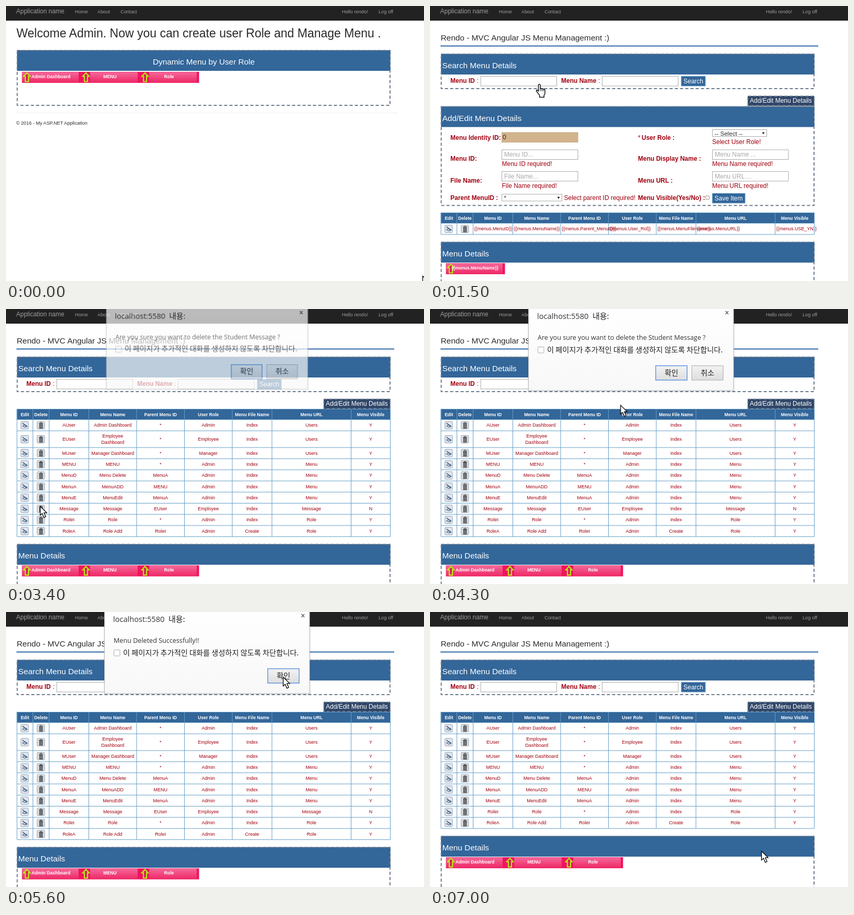
An HTML page that plays this animation: 800 by 526 pixels, repeating every 7.1 s.

```html
<!DOCTYPE html>
<html lang="en">
<head>
<meta charset="utf-8">
<title>Menu management</title>
<style>
html, body { margin: 0; width: 100%; height: 100%; overflow: hidden; background: #fff; }
svg { display: block; width: 100vw; height: 100vh; font-family: "Liberation Sans", Arial, sans-serif; }
text { white-space: pre; fill: #9f000f; }
.b { font-weight: bold; }
.c { text-anchor: middle; }
.w { fill: #fff; }
.n { fill: #9d9d9d; }
.k { fill: #2b2b2b; }
.p { fill: #a9a9a9; }
.d { fill: #333; font-family: "Open Sans", "Noto Sans CJK KR", "Noto Sans CJK", sans-serif; }
.ko { fill: #222; font-family: "Noto Sans CJK KR", "Noto Sans CJK", "Noto Sans CJK JP", sans-serif; }

.page, .dialog, .arrow, .hand { opacity: 0; animation: 7.1s step-end infinite; }
#home { animation-name: home; }
#draft { animation-name: draft; }
#full { animation-name: full; }
#short { animation-name: short; }
.dialog { transform-origin: 385px 0; }
#ask { animation-name: ask; }
#done { animation-name: done; }
#cursor { animation: move 7.1s infinite; }
.arrow { animation-name: arrow; }
.hand { animation-name: hand; }

@keyframes home { 0% { opacity: 1 } 21.12%, 100% { opacity: 0 } }
@keyframes draft { 0% { opacity: 0 } 21.12% { opacity: 1 } 23.94%, 100% { opacity: 0 } }
@keyframes full { 0% { opacity: 0 } 23.94% { opacity: 1 } 81.69%, 100% { opacity: 0 } }
@keyframes short { 0% { opacity: 0 } 81.69%, 100% { opacity: 1 } }
@keyframes ask {
  0% { opacity: 0; transform: none }
  47.88% { opacity: .7; transform: scale(.982) }
  49.29% { opacity: 1; transform: none }
  64.78%, 100% { opacity: 0; transform: none }
}
@keyframes done {
  0% { opacity: 0; transform: none }
  66.19% { opacity: .88; transform: scale(.993) }
  67.6% { opacity: 1; transform: none }
  80.28%, 100% { opacity: 0; transform: none }
}
@keyframes arrow { 0% { opacity: 1 } 18.3% { opacity: 0 } 23.94%, 100% { opacity: 1 } }
@keyframes hand { 0% { opacity: 0 } 18.3% { opacity: 1 } 23.94%, 100% { opacity: 0 } }
@keyframes move {
  0% { transform: translate(797px, 516px); animation-timing-function: steps(8) }
  11.26% { transform: translate(692px, 203px); animation-timing-function: steps(5) }
  18.3% { transform: translate(200px, 134px); animation-timing-function: step-end }
  21.12% { transform: translate(209px, 149px); animation-timing-function: steps(5) }
  28.16% { transform: translate(119px, 407px); animation-timing-function: step-end }
  30.98% { transform: translate(119px, 407px); animation-timing-function: steps(8) }
  42.25% { transform: translate(65px, 377px); animation-timing-function: step-end }
  52.11% { transform: translate(65px, 377px); animation-timing-function: steps(8) }
  63.38% { transform: translate(464px, 119px); animation-timing-function: step-end }
  67.6% { transform: translate(464px, 119px); animation-timing-function: steps(8) }
  78.87% { transform: translate(530px, 124px); animation-timing-function: step-end }
  88.73% { transform: translate(530px, 124px); animation-timing-function: steps(7) }
  98.59%, 100% { transform: translate(634px, 457px); animation-timing-function: step-end }
}
</style>
</head>
<body>
<svg id="stage" viewBox="0 0 800 526" preserveAspectRatio="none"></svg>
<script>
(() => {
const BLUE = '#336699', LINE = '#659ec7', SLATE = '#6d7b8d';

const text = (x, y, str, cls = '', size = 12) =>
  `<text x="${x}" y="${y}" class="${cls}" font-size="${size}">${str}</text>`;
const rect = (x, y, w, h, fill, stroke = 'none', extra = '') =>
  `<rect x="${x}" y="${y}" width="${w}" height="${h}" fill="${fill}" stroke="${stroke}" ${extra}/>`;
const path = (d, stroke, width = 1, fill = 'none') =>
  `<path d="${d}" fill="${fill}" stroke="${stroke}" stroke-width="${width}"/>`;
const group = (id, cls, body) => `<g id="${id}" class="${cls}">${body}</g>`;

const dashed = (x, y, w, h) => rect(x, y, w, h, 'none', SLATE, 'stroke-width="2" stroke-dasharray="6 4"');

function panel(y, h, title, centred) {
  return rect(21, y, 715, 39.5, BLUE) + dashed(21.5, y + .5, 713.5, h) +
    (centred ? text(378.5, y + 27.5, title, 'w c', 15.33) : text(23.5, y + 27.5, title, 'w', 15.33));
}

function bar(y, labels) {
  let out = rect(30.5, y, labels.length * 113, 21, '#f0145c');
  labels.forEach((label, i) => {
    const x = 31 + i * 113, left = i ? 17 : 0, a = x + 9;
    out += rect(x + left, y + .5, 108 - left, 20, 'url(#pink)') +
      path(`M${a} ${y + 2}l6 6.5h-3v10h-6v-10h-3z`, '#b4ee10', 2.2, '#d8205c') +
      text(x + 55, y + 11.5, label, 'w b c', 8.67);
  });
  return out;
}

const field = (x, y, hint = '') =>
  rect(x, y, 145.5, 18.5, '#fff', '#a9a9a9') + text(x + 4.5, y + 13, hint, 'p');
const button = (x, y, w, label) =>
  rect(x, y, w, 18.5, BLUE, LINE) + text(x + 4, y + 13, label, 'w');
const select = (x, y, w, value) =>
  rect(x, y, w, 13, '#fff', '#a9a9a9') + text(x + 4, y + 11, value, 'k', 11.6) +
  path(`M${x + w - 9} ${y + 5}h5l-2.5 4z`, 'none', 0, '#222');

const editIcon = (x, y) =>
  rect(x, y, 14.5, 14.5, '#dfe6ee', '#91a1b5', 'rx="1.5"') +
  path(`M${x + 3} ${y + 9}q4-5 9 0q-4 4-9 0z`, '#5b7492', 1.2, '#b9c8d8') +
  path(`M${x + 3} ${y + 3}l9 7`, '#41566f', 1.4);
const binIcon = (x, y) =>
  rect(x, y, 14.5, 14.5, '#dde2e7', '#98a2ad', 'rx="1.5"') +
  path(`M${x + 3.5} ${y + 3.5}h8M${x + 6} ${y + 2}h3`, '#444', 1.3) +
  rect(x + 4.5, y + 5, 6, 8, '#8b9299', '#444') +
  path(`M${x + 6.5} ${y + 5.5}v7M${x + 8.5} ${y + 5.5}v7`, '#444', .8);

const cols = [21, 51.5, 82.5, 158.5, 250, 341.5, 433, 509, 660.5, 735.5];
const heads = ['Edit', 'Delete', 'Menu ID', 'Menu Name', 'Parent Menu ID', 'User Role',
  'Menu File Name', 'Menu URL', 'Menu Visible'];
const mid = i => (cols[i] + cols[i + 1]) / 2;

// Returns the markup and the bottom edge.
function table(start, rows, raw) {
  let y = start + 20.2;
  let out = rect(21, start, 714.5, 20, BLUE, LINE) +
    heads.map((h, i) => text(mid(i), start + 13, h, 'w b c', 8.6)).join('');
  for (const row of rows) {
    const tall = row.some(cell => cell.includes('|')), h = tall ? 32 : 21.3, m = y + h / 2;
    out += editIcon(28.5, m - 7.2) + binIcon(59.5, m - 7.2);
    row.forEach((cell, i) => {
      const lines = cell.split('|'), x = raw ? cols[i + 2] + 2 : mid(i + 2);
      lines.forEach((s, j) => {
        out += text(x, m + 3 + (j - (lines.length - 1) / 2) * 12.5, s, raw ? '' : 'c', 9);
      });
    });
    y += h;
    out += path(`M21 ${y}H735.5`, LINE);
  }
  out += cols.map(x => path(`M${x} ${start}V${y}`, LINE)).join('');
  return [out, y];
}

const rows = `AUser,Admin Dashboard,*,Admin,Index,Users,Y
EUser,Employee|Dashboard,*,Employee,Index,Users,Y
MUser,Manager Dashboard,*,Manager,Index,Users,Y
MENU,MENU,*,Admin,Index,Menu,Y
MenuD,Menu Delete,MenuA,Admin,Index,Menu,Y
MenuA,MenuADD,MENU,Admin,Index,Menu,Y
MenuE,MenuEdit,MenuA,Admin,Index,Menu,Y
Message,Message,EUser,Employee,Index,Message,N
RoleI,Role,*,Admin,Index,Role,Y
RoleA,Role Add,RoleI,Admin,Create,Role,Y`.split('\n').map(r => r.split(','));
const rawRow = ['MenuID', 'MenuName', 'Parent_MenuID', 'User_Rol', 'MenuFileName', 'MenuURL', 'USE_YN']
  .map(k => `{{menus.${k}}}`);
const items = ['Admin Dashboard', 'MENU', 'Role'];

const nav = rect(0, 0, 800, 28, '#222') + text(19.5, 14.3, 'Application name', 'n') +
  [[132, 'Home'], [175, 'About'], [219, 'Contact'], [643, 'Hello rendo!'], [713, 'Log off']]
    .map(([x, s]) => text(x, 13.5, s, 'n', 9.2)).join('');

const home = text(20, 60, 'Welcome Admin. Now you can create user Role and Manage Menu .', 'k', 23) +
  panel(84.5, 105, 'Dynamic Menu by User Role', true) + bar(126, items) +
  path('M20 204.5H750', '#eee') + text(19.5, 227.3, '© 2016 - My ASP.NET Application', 'k', 9.15);

const search = text(20.5, 66, 'Rendo - MVC Angular JS Menu Management :)', 'k', 15.4) +
  path('M20 76.5H743', '#2f68a8', 2) + panel(91.5, 66, 'Search Menu Details') +
  text(39, 147, 'Menu ID', 'b') + text(89.5, 147, ':') + field(97, 134.5) +
  text(251, 147, 'Menu Name', 'b') + text(322, 147, ':') + field(329.5, 134.5) +
  button(481, 134.5, 46, 'Search') +
  rect(608, 172, 127.5, 19, '#2f4668') + dashed(608.5, 172.5, 126.5, 18) +
  text(612, 185, 'Add/Edit Menu Details', 'w');

const form = panel(192, 189, 'Add/Edit Menu Details') +
  [[39, 255.5, 'Menu Identity ID:'], [405, 255.5, 'User Role :'], [39, 296, 'Menu ID:'],
   [398, 296, 'Menu Display Name :'], [39, 337.5, 'File Name:'], [398, 337.5, 'Menu URL :'],
   [39, 371, 'Parent MenuID :'], [398, 371, 'Menu Visible(Yes/No) :']]
    .map(([x, y, s]) => text(x, y, s, 'b')).join('') +
  [[398, 255.5, '*'], [540, 264, 'Select User Role!'], [137.5, 306, 'Menu ID required!'],
   [540, 306, 'Menu Name required!'], [137.5, 347.5, 'File Name required!'],
   [540, 347.5, 'Menu URL required!'], [256.5, 371, 'Select parent ID required!']]
    .map(a => text(...a)).join('') +
  rect(137.5, 242, 145.5, 18.5, '#d2b48c', '#c4a87f') + text(139, 255, '0', 'k') +
  field(137.5, 275, 'Menu ID...') + field(540.5, 275, 'Menu Name ...') +
  field(137.5, 316.5, 'File Name...') + field(540.5, 316.5, 'Menu URL ...') +
  select(540.5, 236.5, 104, '-- Select --') + select(137.5, 360, 115, '*') +
  rect(527.5, 363, 7, 7, '#f4f4f4', '#999', 'rx="1"') + button(540.5, 358.5, 62.5, 'Save Item');

function manage(y, data, labels, extra = '') {
  const [grid, end] = table(y, data, !!extra);
  return search + extra + grid + panel(end + 14.3, 200, 'Menu Details') + bar(end + 55, labels);
}

const dlgButton = (x, label, focus) =>
  rect(x, 108.5, 60, 27.5, 'url(#grey)', focus ? '#5a8fdc' : '#aaa', focus ? 'stroke-width="1.4"' : '') +
  text(x + 30, 126.5, label, 'ko c', 14.2);

const dialog = (message, buttons) =>
  rect(186.5, -12, 397, 171, '#000', 'none', 'opacity=".06"') +
  rect(188.5, -12, 392.5, 168, 'url(#paper)', '#b8b8b8') +
  text(205, 19, 'localhost:5580', 'd', 14.6) + text(311, 19, '내용:', 'ko', 15) +
  path('M565.5 4l5.5 6m0-6l-5.5 6', '#666', 1.6) +
  text(206, 59, message, 'd', 12.6) +
  rect(206.5, 72.5, 11.5, 11.5, '#fff', '#aaa', 'rx="1.5"') +
  text(224, 82.5, '이 페이지가 추가적인 대화를 생성하지 않도록 차단합니다.', 'ko', 14.2) + buttons;

const gradient = (id, a, b) => `<linearGradient id="${id}" x2="0" y2="1">
  <stop stop-color="${a}"/><stop offset="1" stop-color="${b}"/></linearGradient>`;

const arrow = path('M.5 .5V17.5L4.3 14L7.6 21.8L11 20.3L7.7 12.8H13Z', '#000', 1.3, '#fff');
const hand = path('M-1.5 2q1.7-3 3.6 0v7q2-1.4 3.2 .6q2-1 3 .8q2.6-.6 2.7 2v5q-.2 3-1.8 4.5v3.6' +
  'h-8.5v-3.6l-6.2-8.4q0-2.6 2.3-1.7l1.7 2z', '#000', 1.4, '#fff') +
  path('M2.1 9v5M5.3 10v4M8.3 11v3', '#000');

document.getElementById('stage').innerHTML =
  `<defs>${gradient('pink', '#f5689a', '#ee2866')}${gradient('grey', '#f2f2f2', '#dedede')}` +
  `${gradient('paper', '#fff', '#f8f8f8')}</defs>` + nav +
  group('home', 'page', home) +
  group('draft', 'page', manage(395.5, [rawRow], ['{{menus.MenuName}}'], form)) +
  group('full', 'page', manage(191.5, rows, items)) +
  group('short', 'page', manage(191.5, rows.filter(r => r[0] !== 'Message'), items)) +
  group('ask', 'dialog', dialog('Are you sure you want to delete the Student Message ?',
    dlgButton(432, '확인', true) + dlgButton(501, '취소'))) +
  group('done', 'dialog', dialog('Menu Deleted Successfully!!', dlgButton(501, '확인', true))) +
  group('cursor', '', `<g class="arrow">${arrow}</g><g class="hand">${hand}</g>`);
})();
</script>
</body>
</html>
```
